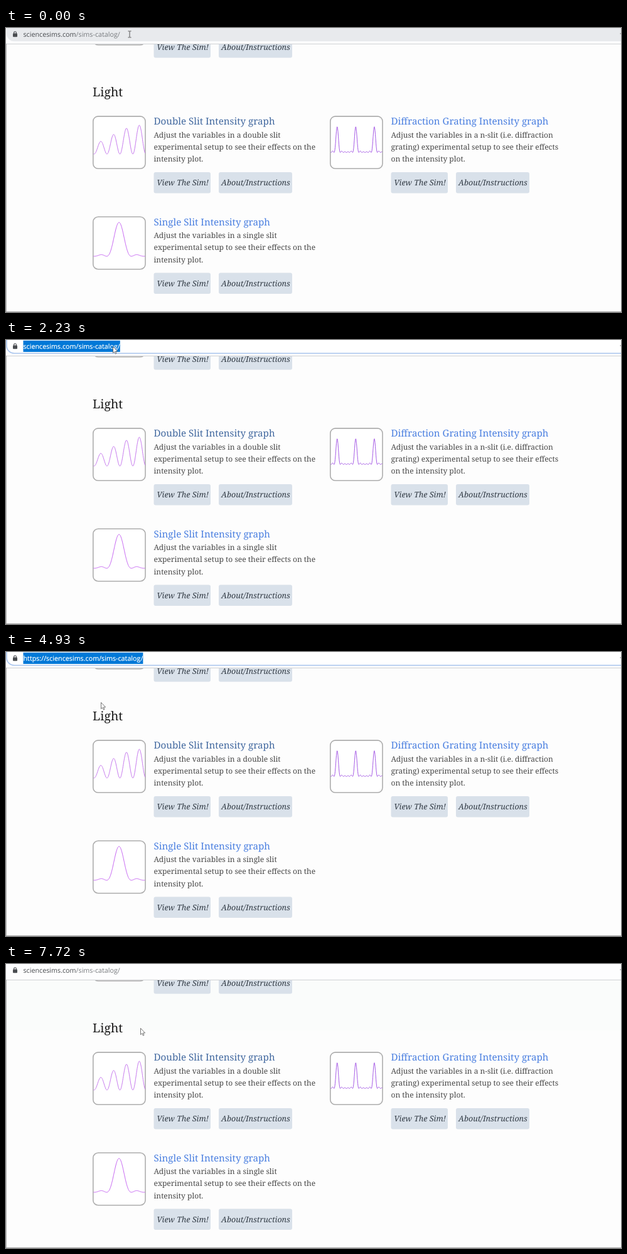
Animation, 980 px wide and 453 px high, one loop 8 s. Source, as an HTML page:

```html
<!DOCTYPE html>
<html lang="en">
<head>
<meta charset="utf-8">
<title>Sims catalog</title>
<style>
  html, body { margin: 0; width: 100%; height: 100%; overflow: hidden; background: #fdfdfd; }
  svg { display: block; width: 980px; height: 453px; }
  text { white-space: pre; text-rendering: geometricPrecision; }
  .serif { font-family: "Noto Serif", serif; }
  .body { font-size: 12.06px; fill: #484848; }
  .title { font-size: 15.17px; fill: #4a7fe0; }
  .heading { font-size: 19.5px; fill: #1c1c1c; }
  .button { font-size: 12.55px; font-style: italic; fill: #333c46; text-anchor: middle; }
  .url { font-family: "Open Sans", sans-serif; font-size: 10.74px; fill: #45484c; }
  .thumb { fill: #fff; stroke: #adadad; stroke-width: 1.6; }
  .curve { fill: none; stroke-width: 1; stroke-linejoin: round; }
</style>
</head>
<body>
<svg id="stage" viewBox="0 0 980 453"></svg>
<script>
const LOOP = 8000;
const stage = document.getElementById('stage');

function add(parent, tag, attrs = {}, content) {
  const el = document.createElementNS('http://www.w3.org/2000/svg', tag);
  for (const name in attrs) el.setAttribute(name, attrs[name]);
  if (content !== undefined) el.textContent = content;
  parent.appendChild(el);
  return el;
}
const show = (el, on) => el.setAttribute('visibility', on ? 'visible' : 'hidden');
const label = (x, y, cls, content) => add(stage, 'text', { x, y, class: cls }, content);
const box = (x, y, width, height, fill, rx = 0) =>
  add(stage, 'rect', { x, y, width, height, fill, rx });

function addButtons(x, y) {
  box(x + 97.5, y, 90.5, 33.5, '#d9e1ea', 3);
  label(x + 143.5, y + 21.2, 'serif button', 'View The Sim!');
  box(x + 201, y, 117, 33.5, '#d9e1ea', 3);
  label(x + 260, y + 21.2, 'serif button', 'About/Instructions');
}

function addThumb(x, y) {
  add(stage, 'rect', { x: x + 0.8, y, width: 83.2, height: 83.4, rx: 8, class: 'thumb' });
}

// intensity(u) gives the height above the base line, u counted from the card's left edge
function addCard({ x, y, title, lines, base, color, intensity, titleColor }) {
  addThumb(x, y + 0.9);
  let d = '';
  for (let u = 1.5; u <= 83.5; u += 0.5)
    d += `${d ? 'L' : 'M'}${x + u} ${(y + base - intensity(u)).toFixed(2)}`;
  add(stage, 'path', { d, class: 'curve', stroke: color });
  const heading = label(x + 97.5, y + 14.2, 'serif title', title);
  if (titleColor) heading.style.fill = titleColor;
  lines.forEach((line, i) => label(x + 97.5, y + 34.7 + 19.3 * i, 'serif body', line));
  addButtons(x, y + 90);
}

function grating(u) {
  const slits = 6, phase = Math.PI * (u - 11.7) / 29.6, s = Math.sin(phase);
  const ratio = Math.abs(s) < 1e-4 ? 1 : Math.sin(slits * phase) / (slits * s);
  return 41 * ratio ** 2;
}
function singleSlit(u) {
  const a = Math.PI * (u - 42.1) / 19.7;
  return 54 * (Math.abs(a) < 1e-4 ? 1 : Math.sin(a) / a) ** 2;
}
const doubleSlit = u =>
  46 * Math.exp(-(((u - 78) / 71.8) ** 2)) * Math.sin(Math.PI * (u - 2.3) / 20.6) ** 2;

// Text with a highlight running between two character boundaries
function selectableText(id, x, y, cls, content, top, height) {
  const base = label(x, y, cls, content);
  const clip = add(add(stage, 'clipPath', { id }), 'rect', { y: top, height });
  const mark = box(0, top, 0, height, '#0078d7');
  const light = add(stage, 'text', {
    x, y, class: cls, 'clip-path': `url(#${id})`, style: 'fill:#fff;stroke:#fff;stroke-width:.2'
  }, content);
  const snap = px => {
    let best = x;
    for (let i = 1; i <= content.length; i++) {
      const edge = x + base.getSubStringLength(0, i);
      if (Math.abs(edge - px) < Math.abs(best - px)) best = edge;
    }
    return best;
  };
  return {
    base,
    update(visible, from, to) {
      const selected = visible && to > from;
      const left = selected ? snap(from) : 0;
      const width = selected ? Math.max(0, snap(to) - left) : 0;
      for (const el of [clip, mark]) {
        el.setAttribute('x', left);
        el.setAttribute('width', width);
      }
      show(base, visible);
      show(mark, width > 0);
      show(light, width > 0);
    }
  };
}

// Page
box(0, 0, 980, 453, '#fdfdfd');
const tint = box(0, 26, 980, 80, '#fafcfb');
addThumb(138, -56.4);
addButtons(138, 14);
const heading = selectableText('headingClip', 138, 109.3, 'serif heading', 'Light', 86, 31);
const setup = ['experimental setup to see their effects on the', 'intensity plot.'];
addCard({
  x: 138, y: 140, base: 61, color: '#c678ee', intensity: doubleSlit, titleColor: '#41689f',
  title: 'Double Slit Intensity graph', lines: ['Adjust the variables in a double slit', ...setup]
});
addCard({
  x: 516, y: 140, base: 58.5, color: '#a65be6', intensity: grating,
  title: 'Diffraction Grating Intensity graph',
  lines: ['Adjust the variables in a n-slit (i.e. diffraction',
    'grating) experimental setup to see their effects', 'on the intensity plot.']
});
addCard({
  x: 138, y: 300.4, base: 63.7, color: '#c665f2', intensity: singleSlit,
  title: 'Single Slit Intensity graph', lines: ['Adjust the variables in a single slit', ...setup]
});

// Address bar
box(0, 0, 980, 25, '#fdfdfe');
const pill = add(stage, 'rect', { x: 1, y: -12, width: 1000, height: 33.2, rx: 12 });
box(0, 25, 980, 1, '#cfd1d4');
box(0, 25, 1, 428, '#b5b5b5');
box(0, 452, 980, 1, '#a8a8a8');
box(978.5, 8.5, 1.5, 1, '#777');
box(11, 8.5, 7, 5.7, '#4a4d51', 1);
add(stage, 'path', { d: 'M12.6 9V7.6a1.9 1.9 0 0 1 3.8 0V9', fill: 'none', stroke: '#4a4d51', 'stroke-width': 1.1 });

const address = 'sciencesims.com/sims-catalog/';
const idleUrl = label(27.5, 14, 'url', 'sciencesims.com');
add(idleUrl, 'tspan', { fill: '#777a7e' }, '/sims-catalog/');
const shortUrl = selectableText('shortClip', 27.5, 14, 'url', address, 1, 18);
const longUrl = selectableText('longClip', 27.5, 14, 'url', 'https://' + address, 1, 18);

// Pointers, both with their hot spot at the origin
const beam = add(stage, 'path', {
  d: 'M-2.5 -5H-.7L0 -4.4L.7 -5H2.5M0 -4.4V4.4M-2.5 5H-.7L0 4.4L.7 5H2.5',
  fill: 'none', stroke: '#555', 'stroke-width': 1
});
const arrow = add(stage, 'path', {
  d: 'M.5 .5V10.7L2.8 8.6L4.4 12.2L6 11.5L4.4 8H7.6Z',
  fill: '#fff', stroke: '#555', 'stroke-width': 0.8, 'stroke-linejoin': 'round'
});

const row = (...xs) => xs.map(x => [x, 10]);
const moves = [
  { start: 0, end: 1, steps: 1, points: row(197) },
  { start: 140, end: 1130, steps: 7, points: row(190, 184, 150, 105, 62, 26, 6) },
  { start: 1280, end: 2230, steps: 8, points: row(17, 29, 50, 78, 107, 134, 156, 170) },
  { start: 2350, end: 3260, steps: 7, points: row(171, 172, 174, 188, 210, 227, 234) },
  { start: 3410, end: 4400, steps: 8, points: row(215, 136, 95, 64, 45, 35, 31, 31) },
  { start: 4680, end: 4930, steps: 3, points: [[62, 27], [126, 66], [151, 80]] },
  { start: 5430, end: 5990, steps: 5, points: [[151, 80], [137, 93]] },
  { start: 6500, end: 7190, steps: 6, points: [[140, 98], [214, 102]] }
];

function pointerAt(t) {
  const { start, end, steps, points } = moves.filter(m => m.start <= t).pop();
  const step = Math.min(steps - 1, Math.floor((t - start) / (end - start) * (steps - 1) + 0.15));
  const pos = steps > 1 ? step / (steps - 1) * (points.length - 1) : 0;
  const i = Math.floor(pos + 1e-6);
  const a = points[i], b = points[Math.min(i + 1, points.length - 1)];
  return a.map((v, k) => v + (b[k] - v) * (pos - i));
}

function render(t) {
  const between = (from, to) => t >= from && t < to;
  const [x, y] = pointerAt(t);
  const focused = between(290, 5430);
  const expanded = between(2650, 5430);

  pill.setAttribute('fill', focused ? '#fff' : t < 290 ? '#e8eaed' : '#fdfdfe');
  pill.setAttribute('stroke', focused ? '#a9c5ee' : 'none');
  pill.setAttribute('stroke-width', 1.6);
  show(tint, t >= 5430);

  show(idleUrl, !focused);
  shortUrl.update(focused && !expanded, t < 1280 ? x : 0, 240);
  longUrl.update(expanded, t < 3410 ? 240 : x * (t < 4400), t < 3410 ? 0 : 240);
  heading.update(true, 138, between(6500, 7720) ? x : 0);

  const pointing = between(1520, 2650) || (t >= 4680 && !between(6500, 7180));
  show(arrow, pointing);
  show(beam, !pointing);
  for (const el of [arrow, beam]) el.setAttribute('transform', `translate(${x} ${y})`);
}

const origin = performance.now();
function tick() {
  render((performance.now() - origin) % LOOP);
  requestAnimationFrame(tick);
}
tick();
</script>
</body>
</html>
```
